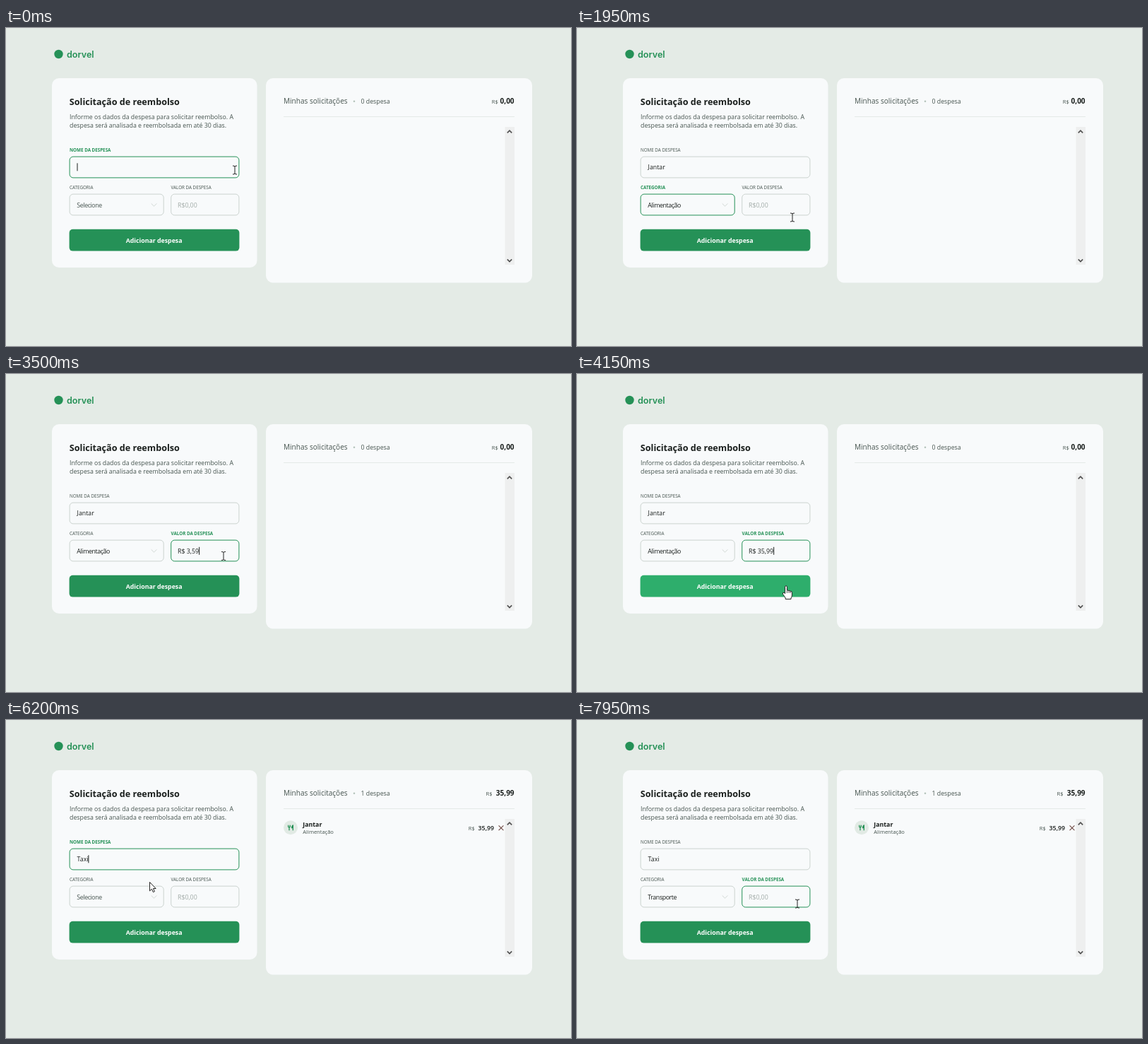
An HTML page with a canvas that plays this animation: 800x450 px, repeating every 8 s.

```html
<!DOCTYPE html>
<html lang="pt-BR">
<head>
<meta charset="utf-8">
<title>Solicitação de reembolso</title>
<style>
html, body { margin: 0; width: 100%; height: 100%; overflow: hidden; background: #e4ebe6; }
canvas { display: block; width: 800px; height: 450px; }
</style>
</head>
<body>
<canvas id="stage"></canvas>
<script>
const canvas = document.getElementById('stage');
const ctx = canvas.getContext('2d');
const dpr = window.devicePixelRatio || 1;
canvas.width = 800 * dpr;
canvas.height = 450 * dpr;

const LOOP = 8000;
const GREEN = '#259157', HOVER = '#2eae6c', PAGE = '#e4ebe6', PANEL = '#f8fafb';
const INK = '#1a1f1d', SOFT = '#46544f', LINE = '#cbd3cf', FAINT = '#a0aaa6';
const TITLE = 12.6, LARGE = 10.05, BODY = 8.79, SMALL = 7.54, TINY = 6.28;

const FIELDS = {
  name: { x: 90, y: 182, w: 240, h: 30, label: 'NOME DA DESPESA' },
  cat: { x: 90, y: 235, w: 133.3, h: 30, label: 'CATEGORIA' },
  value: { x: 233.6, y: 235, w: 96.4, h: 30, label: 'VALOR DA DESPESA' }
};
const BUTTON = { x: 89.6, y: 284.8, w: 240.8, h: 30.8 };
const OPTIONS = ['Alimentação', 'Hospedagem', 'Serviços', 'Transporte', 'Outros'];
const MENU = { x: 90, y: 265.5, w: 133, row: 12.6 };

// Timelines: [start time, value]
const typing = (start, gap, word) =>
  [...word].map((_, i) => [start + i * gap, word.slice(0, i + 1)]);
const nameText = [[0, ''], ...typing(250, 110, 'Jantar'), [4300, ''], ...typing(5350, 140, 'Taxi')];
const valueText = [[0, ''], [3050, 'R$ 0,03'], [3250, 'R$ 0,35'], [3450, 'R$ 3,59'], [3700, 'R$ 35,99'], [4300, '']];
const category = [[0, ''], [1650, 'Alimentação'], [4300, ''], [7050, 'Transporte']];
const focus = [[0, 'name'], [1250, 'cat'], [2400, 'value'], [4300, 'name'], [6450, 'cat'], [7400, 'value']];
const menuOpen = [[0, false], [1250, true], [1650, false], [6450, true], [7050, false]];
const added = [[0, false], [4300, true]];

// Pointer path: [time, x, y]
const path = [
  [0, 324, 201], [850, 324, 201], [1200, 203, 250], [1300, 203, 250], [1600, 176, 273],
  [1680, 176, 273], [1950, 305, 268], [2200, 308, 257.5], [3700, 308, 257.5], [4050, 296, 300],
  [4350, 296, 300], [4780, 239, 199], [5850, 239, 199], [6200, 203.5, 229.5], [6400, 195, 250],
  [6500, 195, 250], [6900, 176, 310], [7080, 176, 310], [7350, 312, 260], [8000, 312, 260]
];

const ARROW = new Path2D('M0 0V12.4L2.9 9.7L4.9 14.1L6.9 13.2L5 9H8.7Z');
const HAND = new Path2D('M-1.4 1.2A1.4 1.4 0 0 1 1.4 1.2V6.4Q2.8 5.6 4 6.8Q5.4 6 6.2 7.4Q8.4 7 8.4 9.2V13Q8.4 15.5 7 17V18.6H-.8V17Q-2 14.8 -4.6 11.4Q-5 9 -3 9.2L-1.4 10.8Z');
const BEAM = new Path2D('M-3 -6Q-.5 -6 0 -5Q.5 -6 3 -6M0 -5V5M-3 6Q-.5 6 0 5Q.5 6 3 6');

const step = (track, t) => track.filter(s => s[0] <= t).pop();
const at = (track, t) => step(track, t)[1];
const inside = (p, r, pad = 0) =>
  p.x >= r.x - pad && p.x <= r.x + r.w + pad && p.y >= r.y - pad && p.y <= r.y + r.h + pad;

function pointerAt(t) {
  const i = Math.max(1, path.findIndex(k => k[0] > t));
  const [t0, x0, y0] = path[i - 1], [t1, x1, y1] = path[i];
  const u = (t - t0) / (t1 - t0), e = u * u * (3 - 2 * u);
  return { x: x0 + (x1 - x0) * e, y: y0 + (y1 - y0) * e };
}

function text(str, x, y, size, color, weight = 400, align = 'left', spacing = 0) {
  ctx.font = `${weight} ${size}px "Open Sans", "Noto Sans", sans-serif`;
  ctx.letterSpacing = spacing + 'px';
  ctx.textAlign = align;
  ctx.fillStyle = color;
  ctx.fillText(str, x, y);
  return ctx.measureText(str).width;
}

function box(x, y, w, h, r, fill, stroke) {
  ctx.beginPath();
  ctx.roundRect(x, y, w, h, r);
  if (fill) { ctx.fillStyle = fill; ctx.fill(); }
  if (stroke) { ctx.strokeStyle = stroke; ctx.stroke(); }
}

function disc(x, y, r, color) {
  ctx.beginPath();
  ctx.arc(x, y, r, 0, Math.PI * 2);
  ctx.fillStyle = color;
  ctx.fill();
}

function line(points, color, width) {
  ctx.beginPath();
  points.forEach(([x, y]) => ctx.lineTo(x, y));
  ctx.strokeStyle = color;
  ctx.lineWidth = width;
  ctx.stroke();
}

const chevron = (x, y, w, h, color, width) =>
  line([[x - w, y - h], [x, y + h], [x + w, y - h]], color, width);

function field(key, active) {
  const f = FIELDS[key], on = key === active;
  text(f.label, f.x, f.y - 6.7, TINY, on ? GREEN : SOFT, on ? 700 : 400);
  ctx.lineWidth = 1;
  box(f.x + 0.1, f.y + 0.1, f.w - 0.2, f.h - 0.2, 5, null, on ? GREEN : LINE);
}

function caret(x, y, since) {
  if (since % 1000 < 500) line([[x, y - 5.5], [x, y + 5.5]], INK, 1);
}

function drawForm(t, pointer) {
  const active = at(focus, t), name = at(nameText, t), value = at(valueText, t), cat = at(category, t);
  box(65, 71, 290.5, 268, 10, PANEL);
  text('Solicitação de reembolso', 89.8, 108.8, TITLE, INK, 700);
  text('Informe os dados da despesa para solicitar reembolso. A', 90, 129.2, BODY, SOFT);
  text('despesa será analisada e reembolsada em até 30 dias.', 90, 141.2, BODY, SOFT);
  Object.keys(FIELDS).forEach(key => field(key, active));

  const nameW = text(name, 100.6, 200.2, BODY, INK);
  text(cat || 'Selecione', 100.3, 253.5, BODY, cat ? INK : SOFT, 400, 'left', -0.38);
  chevron(209.5, 250.3, 3.8, 1.9, LINE, 0.9);
  const valueW = text(value || 'R$0,00', 243, 253.6, BODY, value ? INK : FAINT);

  const since = track => t - Math.max(step(track, t)[0], step(focus, t)[0]);
  if (active === 'name') caret(101 + nameW, 196.8, since(nameText));
  if (active === 'value') caret(value ? 243.7 + valueW : 244, 250.3, since(valueText));

  box(BUTTON.x, BUTTON.y, BUTTON.w, BUTTON.h, 5, inside(pointer, BUTTON) ? HOVER : GREEN);
  text('Adicionar despesa', 209.6, 303.6, BODY, '#fff', 700, 'center');
}

function drawMeal(x, y) {
  disc(x, y, 10, '#e1eae4');
  [-3.6, -2, -0.4].forEach(d => line([[x + d, y - 3.6], [x + d, y - 1]], GREEN, 0.9));
  line([[x - 3.6, y - 0.7], [x - 0.4, y - 0.7]], GREEN, 1.2);
  line([[x - 2, y - 0.7], [x - 2, y + 4]], GREEN, 1.3);
  line([[x + 3.3, y - 3.8], [x + 3.3, y + 4]], GREEN, 1.3);
  ctx.beginPath();
  ctx.moveTo(x + 3.6, y - 4);
  ctx.quadraticCurveTo(x + 0.6, y - 2.6, x + 1, y + 1);
  ctx.lineTo(x + 3.6, y + 1);
  ctx.fillStyle = GREEN;
  ctx.fill();
}

function drawList(t) {
  const has = at(added, t);
  box(368, 71, 377, 289.5, 10, PANEL);
  text('Minhas solicitações', 393, 107, LARGE, SOFT);
  disc(493, 103.7, 1.3, '#b5c3bb');
  text(has ? '1 despesa' : '0 despesa', 502.5, 106.8, BODY, SOFT);
  text('R$', has ? 688.5 : 696.8, 106.8, SMALL, SOFT, 400, 'right');
  text(has ? '35,99' : '0,00', 719.6, 107, LARGE, INK, 700, 'right');
  line([[393, 125.5], [720, 125.5]], '#e5eae8', 1);

  box(706.5, 140, 13.5, 195, 0, '#eeefef');
  chevron(713, 146.8, 3.2, -1.6, '#505050', 1.6);
  chevron(713, 329, 3.2, 1.6, '#505050', 1.6);

  if (!has) return;
  drawMeal(403, 152.3);
  text('Jantar', 420.3, 150.8, BODY, INK, 700);
  text('Alimentação', 420.3, 160.8, SMALL, SOFT);
  text('R$', 663.8, 156, SMALL, SOFT, 400, 'right');
  text('35,99', 691, 156.3, BODY, INK, 600, 'right');
  [-1, 1].forEach(s => line([[701 - 3.4 * s, 149.4], [701 + 3.4 * s, 156.2]], '#6e4843', 1.1));
}

function drawMenu(pointer) {
  const { x, y, w, row } = MENU;
  ctx.lineWidth = 0.8;
  box(x, y, w, row * OPTIONS.length, 0, '#fff', '#8b9490');
  const hot = Math.floor((pointer.y - y) / row);
  OPTIONS.forEach((label, i) => {
    const top = y + i * row;
    if (i === hot) box(x + 0.5, top, w - 1, row, 0, '#1967d2');
    text(label, x + 10.3, top + 9.3, BODY, i === hot ? '#fff' : INK, 400, 'left', -0.38);
  });
}

function drawPointer(p, open) {
  ctx.save();
  ctx.translate(p.x, p.y);
  ctx.lineWidth = 1;
  ctx.strokeStyle = '#222';
  ctx.fillStyle = '#fff';
  const solid = shape => { ctx.fill(shape); ctx.stroke(shape); };
  if (open) solid(ARROW);
  else if (inside(p, BUTTON)) {
    solid(HAND);
    [1.4, 4, 6.2].forEach(x => line([[x, 7], [x, 10]], '#222', 0.8));
  } else if (inside(p, FIELDS.name) || inside(p, FIELDS.value, 5)) ctx.stroke(BEAM);
  else solid(ARROW);
  ctx.restore();
}

function draw(t) {
  const pointer = pointerAt(t), open = at(menuOpen, t);
  ctx.setTransform(dpr, 0, 0, dpr, 0, 0);
  ctx.fillStyle = PAGE;
  ctx.fillRect(0, 0, 800, 450);

  disc(74.5, 37, 6.2, GREEN);
  ctx.font = '600 12.6px Inter, sans-serif';
  ctx.letterSpacing = '0px';
  ctx.textAlign = 'left';
  ctx.fillText('dorvel', 86, 41.5);

  drawForm(t, pointer);
  drawList(t);
  if (open) drawMenu(pointer);
  drawPointer(pointer, open);
}

const start = performance.now();
function tick() {
  draw((performance.now() - start) % LOOP);
  requestAnimationFrame(tick);
}
tick();
</script>
</body>
</html>
```
